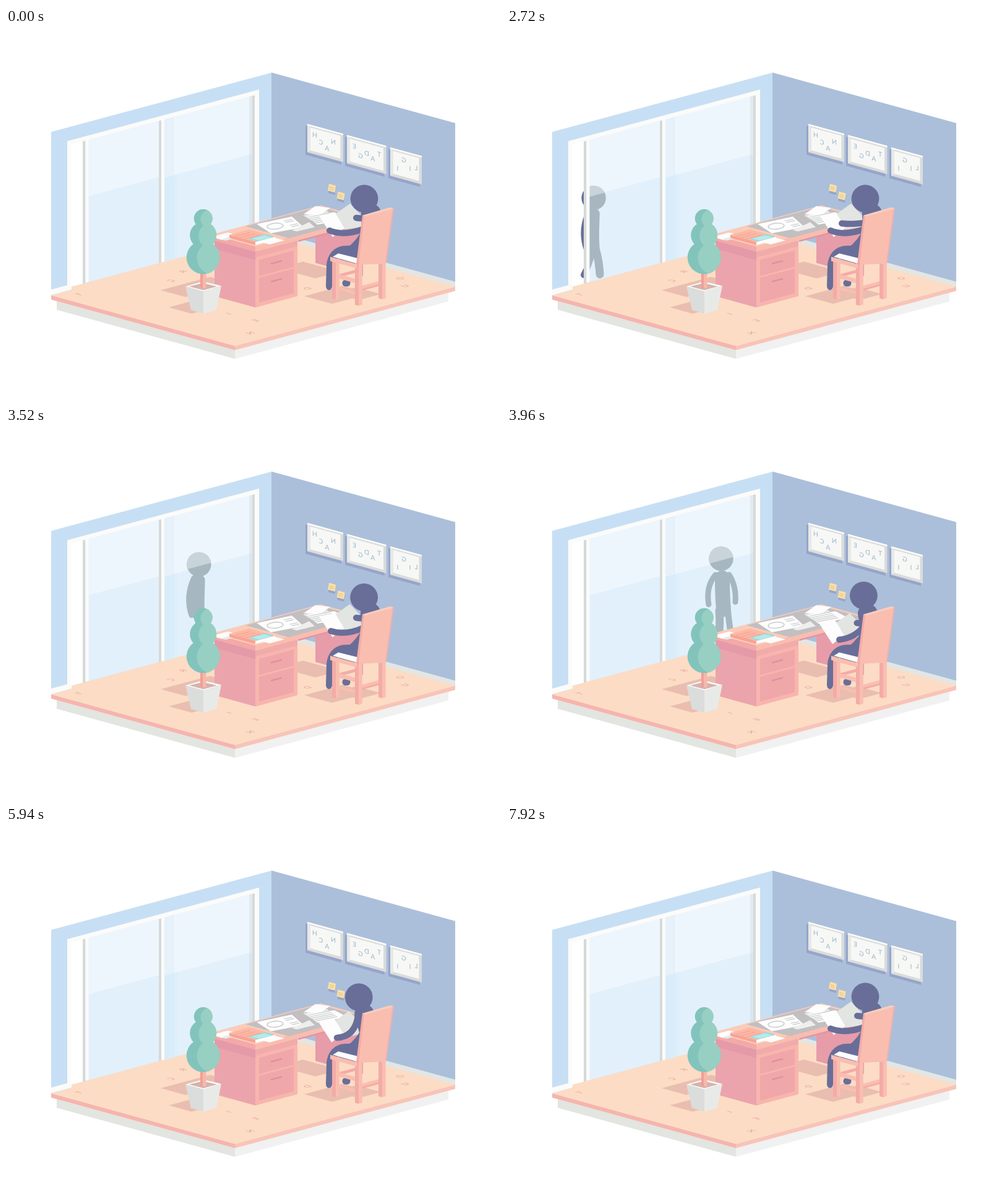
An HTML page with a canvas for the animation above (8120 ms loop, 800x600 px).

```html
<!DOCTYPE html>
<html lang="en">
<head>
<meta charset="utf-8">
<title>Office</title>
<style>
html, body { margin: 0; width: 100%; height: 100%; overflow: hidden; background: #fff; }
canvas { display: block; width: 800px; height: 600px; }
</style>
</head>
<body>
<canvas id="stage" width="800" height="600"></canvas>
<script>
const ctx = document.getElementById('stage').getContext('2d');
const LOOP = 8120, STEP = 40;
const UP = -.269, DOWN = .275; // slopes of the two ground axes
const INK = '#696e98', SHADE = '#e9beb0', WALL_SHADE = '#97a4ca', WHITE = '#fdfdfd';
const FRAME = '#fbfbfa', STILE = '#d5dad8', FLOOR = '#fcdcc4', PINK = '#f4aba7', PEACH = '#f9beb0';

const lerp = (a, b, k) => a + (b - a) * k;
const mix = (a, b, k) => a.map((v, i) => lerp(v, b[i], k));
const clamp = v => Math.max(0, Math.min(1, v));
const ease = (t, from, to) => { const k = clamp((t - from) / (to - from)); return k * k * (3 - 2 * k); };

function fill(color, path) { ctx.fillStyle = color; ctx.fill(path); }
const poly = (color, pts) => fill(color, new Path2D('M' + pts + 'Z'));
const shape = (color, d) => fill(color, new Path2D(d));
function line(color, width, d, cap = 'round') {
  ctx.strokeStyle = color; ctx.lineWidth = width; ctx.lineCap = cap;
  ctx.stroke(new Path2D(d));
}
function disc(color, x, y, r) {
  ctx.fillStyle = color; ctx.beginPath(); ctx.arc(x, y, r, 0, 7); ctx.fill();
}
function letter(ch, x, y, size, color, axes) {
  ctx.save();
  ctx.transform(...axes, x, y);
  ctx.font = `600 ${size}px Lato, sans-serif`;
  ctx.textAlign = 'center'; ctx.textBaseline = 'middle'; ctx.fillStyle = color;
  ctx.fillText(ch, 0, size * .05);
  ctx.restore();
}

// Upright panel starting at its top left corner.
const panel = (x, y, w, h, slope) => new Path2D(`M${x} ${y}l${w} ${w * slope}v${h}l${-w} ${-w * slope}Z`);
const face = (color, x, y, w, h, slope) => fill(color, panel(x, y, w, h, slope));
// Flat rectangle given by its front corner and its reach to the left and right.
const tile = (color, x, y, l, r) =>
  fill(color, new Path2D(`M${x} ${y}l${r} ${r * UP}l${-l} ${-l * DOWN}l${-r} ${-r * UP}Z`));
function block(x, y, l, r, h, left, right, top) {
  face(left, x - l, y - l * DOWN, l, h, DOWN);
  face(right, x, y, r, h, UP);
  if (top) tile(top, x, y, l, r);
}

// Vertical strip of the window, measured down from its inner top edge.
const GLASS_H = 230, HORIZON = 91, HORIZON2 = 94;
const strip = (x, w, top = 0, bottom = GLASS_H) => panel(x, 181 + (x - 133) * UP + top, w, bottom - top, UP);

function room() {
  face('#c7dff4', 73, 168, 356, 265, UP);
  face('#abbfda', 429, 72, 297, 260, DOWN);
  face('#e2e6e4', 429, 328.5, 297, 10, DOWN);
  block(370, 521, 288, 345, 14, '#e2e5e0', '#f0f1f0');
  block(370, 514, 297, 356, 7, '#f5b5ae', '#f8c4b8', FLOOR);
  face(FRAME, 73, 423, 33, 9, UP);
  face(FRAME, 99, 183, 310, 235, UP);
  face(FLOOR, 106, 418, 323, 8, UP);
}

function glass() {
  fill('#fff', strip(105, 19));
  for (const [x, w, horizon] of [[133, 114, HORIZON], [256, 142, HORIZON2]]) {
    fill('#e2f0fb', strip(x, w));
    fill('#eef6fd', strip(x, w, 0, horizon));
  }
  fill('#d8edf9', strip(256, 16, HORIZON2));
  fill('#ddeffa', strip(272, 6, HORIZON2));
  fill('#e6f1fa', strip(256, 16, 0, HORIZON2));
  fill('#e2eaf0', strip(393, 5, 0, HORIZON2));
  fill('#d8e6ef', strip(393, 5, HORIZON2));
}

function stiles() {
  for (const [x, gray, white] of [[124, 4.5, 5], [247, 4, 5], [398, 4, 7]]) {
    fill(STILE, strip(x, gray));
    fill(FRAME, strip(x + gray, white));
  }
}

function walkerX(t) {
  if (t < 3400) return 236 + (t - 3160) * .218;
  if (t < 4460) { const k = 1 - clamp((t - 3400) / 520); return 346 - 57.7 * k * k; }
  return 346 + 92 * Math.pow((t - 4460) / 420, 2);
}

function walkerBody(t, color) {
  const x = walkerX(t), base = 213 + (x - 346) * UP;
  const front = ease(t, 3500, 3900) * (1 - ease(t, 4460, 4700));
  const stride = Math.cos((x - 140) * .0453), s = stride * 13;
  const bob = 6.5 * stride * stride * (1 - front), foot = 130 - bob;
  const limb = (w, side, facing) => {
    const p = mix(side, facing, front);
    line(color, w, `M${p[0]} ${p[1]}Q${p.slice(2)}`);
  };
  ctx.save();
  ctx.translate(x, base + bob);
  disc(color, 0, 0, 19.7);
  limb(9, [-8, 22, -22, 52, -12, 82], [-9, 26, -25, 45, -20, 74]);
  limb(9, [5, 24, 5, 50, 3, 72], [13, 26, 25, 45, 23, 70]);
  limb(13, [3, 82, 5 + s * .3, 102, -3 + s, foot], [-3, 84, -1, 105, -4, 126]);
  limb(10, [-2, 82, 1 - s * .4, 102, -3 - s, foot + 1], [11, 84, 13, 105, 16, 122]);
  limb(lerp(21, 24, front), [-1, 26, -3, 50, -1, 80], [2, 31, 2, 60, 4, 82]);
  ctx.restore();
}

function walker(t) {
  if (t < 2320 || t > 4880) return;
  const layers = [[INK, strip(106, 18)], ['#a6b7c0', strip(133, 265)], ['#c8d4d9', strip(133, 265, 0, HORIZON + 1)]];
  for (const [color, area] of layers) {
    ctx.save(); ctx.clip(area); walkerBody(t, color); ctx.restore();
  }
}

function picture(x, w, word, drops) {
  const y = 155 + (x - 487) * .283;
  const inset = (color, d) => face(color, x + d, y + d * 1.3, w - 2 * d, 46 - 2 * d, DOWN);
  face(WALL_SHADE, x - 3, y + 3, w, 47, DOWN);
  face('#d9dcda', x, y, w, 46, DOWN);
  face(WHITE, x, y, w, 2.5, DOWN);
  face('#e5e8e5', x, y + 2, 4, 42, DOWN);
  inset('#f7f8f5', 4.5);
  [...word].forEach((ch, i) =>
    letter(ch, x + 12 + i * 10, y + 3 + i * 2.75 + drops[i], 10.5, '#a9bfd3', [-1, -.27, 0, 1]));
}

function wallThings() {
  picture(487, 58, 'HCAN', [15, 24, 31, 18]);
  picture(551, 63.5, 'EGDAT', [15, 28, 21, 27, 17]);
  picture(621, 51, 'IGIL', [31, 15, 26, 22]);
  for (const [x, y] of [[521, 252], [535.5, 264.5]]) {
    face(WALL_SHADE, x, y + 3, 11, 12, DOWN);
    poly('#fce0a6', [x + 1, y, x + 12, y + 3, x + 10.5, y + 14, x - 1, y + 11]);
    for (const d of [5, 8]) line('#dcbd86', 1, `M${x + 3 - d / 8} ${y + d}l6 1.6`);
  }
}

function floorThings() {
  const marks = { T: [118, 431], R: [286, 394], C: [267, 409], I: [360, 462], E: [403, 473],
    N: [395, 493], D: [487, 421], O: [637, 405], U: [645, 417] };
  for (const ch in marks) letter(ch, ...marks[ch], 13, '#e5aaa5', [-.94, .25, .85, .3]);
  tile(SHADE, 290, 435, 40, 80);
  tile(SHADE, 300, 462, 37, 40);
  tile(SHADE, 500, 405, 60, 40);
  tile(SHADE, 527, 446, 45, 62);
  tile(SHADE, 570, 440, 40, 36);
}

function desk() {
  face('#e79ca9', 500, 300, 77, 80, DOWN);
  face('#e293a6', 472, 335, 105, 11, UP);
  block(403, 361, 66, 68, 91, '#eba4ac', '#f7b5ae');
  face('#e49aa8', 337, 343, 66, 14, DOWN);
  face('#f1abaa', 403, 361, 68, 10, UP);
  for (const [y, h] of [[375, 26], [404, 40]]) {
    face('#f0a7a9', 409, y, 56, h, UP);
    face('#e08f9e', 428, y + 5, 18, 2.5, UP);
  }
  block(403, 353, 70, 175, 9, '#f3a9a8', '#f9bdaf', '#fbcbb8');
  tile('#c2bfc1', 457, 340, 70, 119);
  deskPapers();
}

function deskPapers() {
  const text = (x, y, w, rows) => {
    for (let i = 0; i < rows; i++) line('#c9cccd', 1.2, `M${x + i * 3} ${y + i * 2.3}l${w} ${-w * .2}`);
  };
  poly('#e8e9e7', '480,303 519,296 528,303 495,312');
  poly(WHITE, '481,301 500,288 524,291 507,303');
  poly(WHITE, '486,304 531,298 552,309 503,318');
  text(489, 306, 34, 5);
  poly(WHITE, '405,317 462,305 481,322 428,332');
  poly('#eeefed', '462,327 490,314 499,322 470,329');
  ctx.strokeStyle = '#c9cccd'; ctx.lineWidth = 1.5;
  ctx.beginPath(); ctx.ellipse(435, 320.5, 13, 4.8, -.08, 0, 7); ctx.stroke();
  text(449, 312, 13, 2);
  text(459, 319, 12, 2);

  tile(WHITE, 350, 343, 18, 27);
  tile('#e8e9e7', 355, 344, 8, 13);
  tile(WHITE, 426, 350, 23, 24);
  block(403, 346, 42, 32, 5, '#f7a394', '#fdfdfd', '#fbb9a6');
  tile('#8fe0e4', 406, 345, 14, 28);
  for (let i = 0; i < 3; i++) {
    line('#f7a08f', 1.2, `M${370 + i * 8} ${337 + i * 2}l24 -6`);
    line('#d6f3f2', 1.2, `M${399 + i * 4} ${341 + i}l20 -5`);
  }
}

function plant() {
  poly(FRAME, '290,418 318,410 348,417 319,426');
  poly('#d3b3ae', '296,418 318,412.5 341,418 319,424');
  face('#f29e98', 314, 392, 5, 29, 0);
  face('#f9b7aa', 318, 392, 5.5, 29, 0);
  poly('#dadddb', '290,418 319,426 319,462 299,456');
  poly('#e8eae7', '319,426 348,417 340,456 319,462');
  const balls = [[308, 15], [335, 21.5], [371, 27]], crown = new Path2D();
  for (const [y, r] of balls) {
    crown.moveTo(318.7 + r, y);
    crown.arc(318.7, y, r, 0, 7);
  }
  fill('#82c4bc', crown);
  ctx.save();
  ctx.clip(crown);
  for (const [y, r] of balls) disc('#98cfc3', 322 + r * .5, y + 1, r);
  ctx.restore();
}

const READ = { head: [579, 276], shoulder: [590, 300], hand: [523, 327.5], elbow: [546, 337], joint: [578, 325], grip: [566, 307], drop: [0] };
const LOOK = { head: [576.4, 272.5], shoulder: [583, 302], hand: [537, 344], elbow: [562, 341], joint: [576, 323], grip: [565.5, 317], drop: [1] };
const LEAN = { ...LOOK, head: [569.3, 277], shoulder: [578, 305], hand: [536, 344], elbow: [566, 342], joint: [568, 304], grip: [572, 312] };

const blend = (a, b, k) => Object.fromEntries(Object.keys(a).map(key => [key, mix(a[key], b[key], k)]));
function seatedPose(t) {
  if (t < 4460) return blend(READ, LOOK, ease(t, 3380, 3960));
  if (t < 5800) return blend(LOOK, LEAN, ease(t, 4440, 5000));
  return blend(LEAN, READ, ease(t, 5800, 6420));
}
function flipTime(t) {
  if (t >= 6900) return t - 6900;
  if (t >= 2300) return t - 2300;
  return (t - 480) * .93;
}

function pages(drop, turn) {
  ctx.save();
  ctx.translate(-2 * drop, 17 * drop);
  poly('#e2e5e1', '532,301 556,284 576,305 574,322 547,326');
  ctx.translate(0, -4 * drop);
  poly(WHITE, '506,304 532,299 547,324 528,338');
  if (turn > 0 && turn < 1) {
    const edge = mix([575, 305, 557, 285], [528, 338, 506, 304], turn);
    poly(turn < .5 ? '#e9ebe8' : WHITE, [532, 301, 547, 325, ...edge]);
  }
  ctx.restore();
}

function reader(t) {
  const p = seatedPose(t), f = flipTime(t);
  const reach = ease(f, 0, 380) - ease(f, 740, 1020);
  const grip = mix(p.grip, [541, 316], reach);
  pages(p.drop[0], ease(f, 420, 760));
  line(INK, 32, `M${p.shoulder}L592 350`);
  shape(INK, 'M578 322Q567 344 552 355H578Z');
  disc(INK, ...p.head, 22.4);
  line(INK, 10, `M${grip}Q${grip[0] + 14} ${grip[1] + 2} 580 ${grip[1] - 1}`);
  line(INK, 10, `M${p.hand}Q${p.elbow} ${p.joint}`);
  line(INK, 11, 'M549 412.5h2');
  shape(INK, 'M576 352H553C532 351 520 364 518 383L517 417C517 426 527 426 527 417V385H570Z');
}

function post(x, y, h) {
  face(PINK, x, y, 6, h, DOWN);
  face(PEACH, x + 6, y + 1.6, 5.7, h, UP);
}

function chair() {
  face(FLOOR, 530, 378, 38, 18, DOWN);
  poly(WHITE, '528,370 537,364.5 567,372 567,381');
  face(PINK, 535, 399, 31, 5, UP);
  face(PINK, 571, 422, 34, 4, UP);
  face(PEACH, 571, 418, 34, 5, UP);
  face(PEACH, 533, 397, 34, 7, DOWN);
  face(PEACH, 536, 418, 30, 5, DOWN);
  post(527, 373, 64);
  post(602, 375, 62);
  post(564, 380, 67.5);
  face(PEACH, 524, 370, 43, 7, DOWN);
  poly(PINK, '576,303 580,303 573,382 566,381');
  poly(PEACH, '579,303 625,291 613,381 570,383');
  poly('#fbcdbd', '576,303 621,290 627,292 580,305');
  poly('#f5b0a9', '625,292 627,292 615,379 613,381');
}

function draw(t) {
  ctx.fillStyle = '#fff';
  ctx.fillRect(0, 0, 800, 600);
  room();
  glass();
  walker(t);
  stiles();
  wallThings();
  floorThings();
  desk();
  plant();
  reader(t);
  chair();
}

const start = performance.now();
function tick(now) {
  const t = Math.max(0, now - start) % LOOP;
  draw(Math.floor(t / STEP) * STEP);
  requestAnimationFrame(tick);
}
draw(0);
requestAnimationFrame(tick);
</script>
</body>
</html>
```
